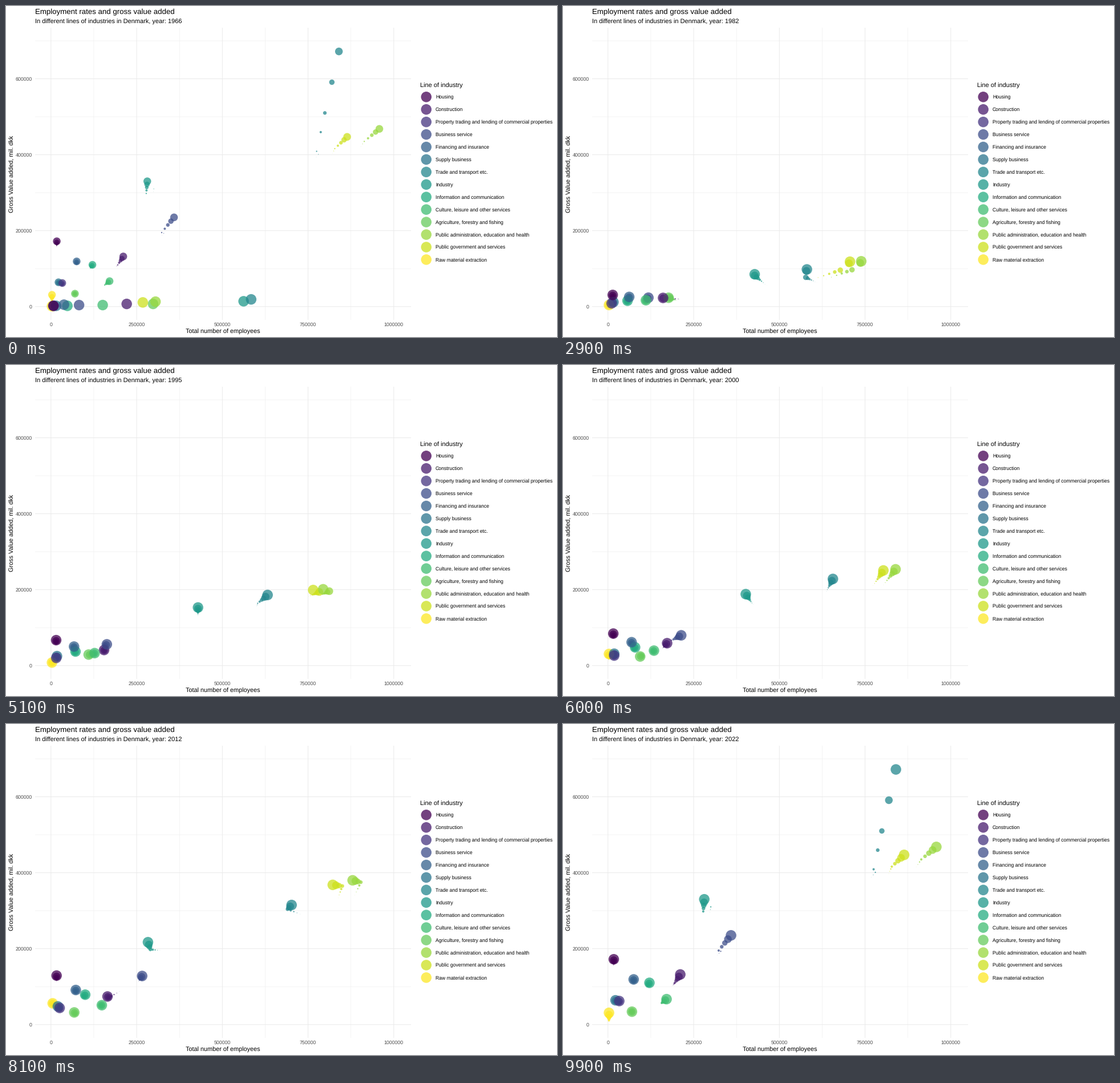
A matplotlib script for the animation above (10 s loop, 966 by 580 pixels).

```python
import numpy as np
import matplotlib.pyplot as plt
from matplotlib.animation import FuncAnimation

W, H, DPI = 966, 580, 64
PT = 72 / DPI              # points per pixel
FRAMES, WAKE = 100, 10
RADIUS, ALPHA = 9.25, 0.75
FIRST, LAST = 1966, 2022

plt.rcParams.update({"font.family": "Liberation Sans", "text.hinting": "none"})

LINES = [
    "Housing", "Construction",
    "Property trading and lending of commercial properties",
    "Business service", "Financing and insurance", "Supply business",
    "Trade and transport etc.", "Industry", "Information and communication",
    "Culture, leisure and other services", "Agriculture, forestry and fishing",
    "Public administration, education and health",
    "Public government and services", "Raw material extraction",
]
COLORS = plt.cm.viridis(np.linspace(0, 1, len(LINES)))
COLORS[:, 3] = ALPHA
STEPS = np.arange(FRAMES)
PROGRESS = STEPS[:, None] / (FRAMES - 1)


def keyed(*keys):
    """Straight moves between (year, thousand employees, billion dkk) keys."""
    year, jobs, value = np.array(keys, float).T
    at = np.round((year - FIRST) / (LAST - FIRST) * (FRAMES - 1))
    return np.column_stack([np.interp(STEPS, at, jobs),
                            np.interp(STEPS, at, value)])


def growth(start, end, power):
    """Power-law growth from start to end; power may differ per axis."""
    start, end = np.array(start), np.array(end)
    return start + (end - start) * PROGRESS ** np.array(power)


public = keyed(
    (1966, 305, 13), (1976, 577, 53), (1981, 712, 97), (1982, 736, 115),
    (1991, 782, 184), (1994, 812, 196), (1995, 794, 201), (2002, 859, 277),
    (2005, 864, 298), (2010, 904, 375), (2012, 880, 380), (2018, 899, 415),
    (2020, 914, 435), (2022, 958, 468))
# Government runs just behind the wider public sector.
gap = keyed((1966, 37, 2), (1976, 45, 1), (1982, 33, 1), (1995, 29, 2),
            (2005, 42, 4), (2012, 58, 12), (2022, 94, 21))

# Ordered from the bottom of the stack to the top.
paths = {
    "Agriculture, forestry and fishing": keyed(
        (1966, 298, 7), (1976, 215, 11), (1982, 180, 23), (1995, 110, 29),
        (2005, 78, 19), (2012, 68, 32), (2022, 70, 34)),
    "Raw material extraction": keyed(
        (1966, 3, 1), (1982, 3, 4), (1995, 3, 8), (2005, 3, 53),
        (2012, 5, 56), (2020, 3, 11), (2022, 3, 31)),
    "Industry": keyed(
        (1966, 562, 14), (1973, 546, 31), (1976, 478, 44), (1982, 428, 82),
        (1995, 429, 153), (2001, 396, 196), (2005, 353, 192),
        (2010, 290, 198), (2012, 283, 217), (2019, 300, 310),
        (2020, 278, 298), (2022, 281, 330)),
    "Supply business": growth((15, 2), (22, 64), 1.5),
    "Construction": keyed(
        (1966, 221, 7), (1976, 216, 16), (1979, 205, 20), (1982, 161, 22),
        (1995, 155, 41), (2008, 200, 87), (2010, 168, 71), (2012, 165, 74),
        (2020, 195, 110), (2022, 211, 132)),
    "Trade and transport etc.": keyed(
        (1966, 584, 19), (1976, 626, 56), (1981, 577, 77), (1982, 579, 94),
        (1992, 603, 164), (1995, 632, 186), (2002, 667, 247),
        (2005, 679, 271), (2008, 727, 291), (2010, 690, 304),
        (2012, 702, 315), (2019, 780, 401), (2020, 775, 409),
        (2021, 799, 510), (2022, 840, 672)),
    "Information and communication": growth((48, 2), (121, 110), 1.7),
    "Financing and insurance": growth((38, 5), (75, 119), (0.35, 1.4)),
    "Property trading and lending of commercial properties":
        growth((8, 2), (33, 62), 1.8),
    "Housing": growth((7, 2), (17, 172), (0.3, 1.45)),
    "Business service": keyed(
        (1966, 82, 4), (1982, 116, 22), (1995, 163, 56), (2001, 225, 85),
        (2005, 248, 103), (2012, 266, 128), (2019, 329, 193),
        (2020, 323, 195), (2022, 359, 235)),
    "Public administration, education and health": public,
    "Culture, leisure and other services": keyed(
        (1966, 151, 4), (1976, 110, 8), (1982, 110, 16), (2005, 141, 46),
        (2020, 157, 57), (2022, 171, 67)),
    "Public government and services": public - gap,
}


def px(jobs):
    return 78.8 + jobs * 0.601


def py(value):
    return 526.7 - value * 0.6653


PATHS = np.array([np.column_stack([px(p[:, 0]), py(p[:, 1])])
                  for p in paths.values()])
HUES = [COLORS[LINES.index(line)] for line in paths]
AGES = np.arange(WAKE)[::-1]                 # oldest first, head last
FALLOFF = (1 - AGES / WAKE) ** 3
SIZES = np.repeat((2 * RADIUS * FALLOFF * PT) ** 2, len(paths))

fig = plt.figure(figsize=(W / DPI, H / DPI), dpi=DPI, facecolor="white")
ax = fig.add_axes([0, 0, 1, 1])
ax.set(xlim=(0, W), ylim=(H, 0))
ax.axis("off")


def label(x, y, text, size, color="black", **kw):
    return ax.text(x, y, text, fontsize=size * PT, color=color,
                   va="baseline", **kw)


def grid(xs, ys, width):
    style = dict(colors="#ebebeb", linewidths=width * PT, zorder=1, snap=False)
    ax.vlines(xs, 38, 550, **style)
    ax.hlines(ys, 51, 710, **style)


x_ticks = np.arange(0, 1001, 250)
y_ticks = np.arange(0, 601, 200)
grid(px(x_ticks[:-1] + 125), py(y_ticks + 100), 0.53)
grid(px(x_ticks), py(y_ticks), 1.07)
for v in x_ticks:
    label(px(v), 560.7, str(v * 1000), 8.8, "#4d4d4d", ha="center")
for v in y_ticks:
    label(46, py(v) + 3.4, str(v * 1000), 8.8, "#4d4d4d", ha="right")

label(51, 14.6, "Employment rates and gross value added", 13.2)
subtitle = label(51, 31, "", 11)
label(380.5, 573.5, "Total number of employees", 10.9, ha="center")
label(13.4, 294, "Gross Value added, mil. dkk", 10.9, ha="center",
      rotation=90, rotation_mode="anchor")

label(726, 142.3, "Line of industry", 11)
rows = 159.3 + 21.93 * np.arange(len(LINES))
ax.scatter(np.full(len(LINES), 736.8), rows, s=(2 * RADIUS * PT) ** 2,
           c=COLORS, linewidths=0)
for y, line in zip(rows, LINES):
    label(753, y + 3.1, line, 8.6)

dots = ax.scatter(np.zeros(SIZES.size), np.zeros(SIZES.size), s=SIZES,
                  c=np.tile(HUES, (WAKE, 1)), linewidths=0, zorder=3)


def draw(i):
    past = (i - AGES) % FRAMES
    dots.set_offsets(PATHS[:, past].transpose(1, 0, 2).reshape(-1, 2))
    year = round(FIRST + (LAST - FIRST) * i / (FRAMES - 1))
    subtitle.set_text(
        f"In different lines of industries in Denmark, year: {year}")
    return dots, subtitle


anim = FuncAnimation(fig, draw, frames=FRAMES, interval=100, repeat=True,
                     repeat_delay=0)
plt.show()
```
